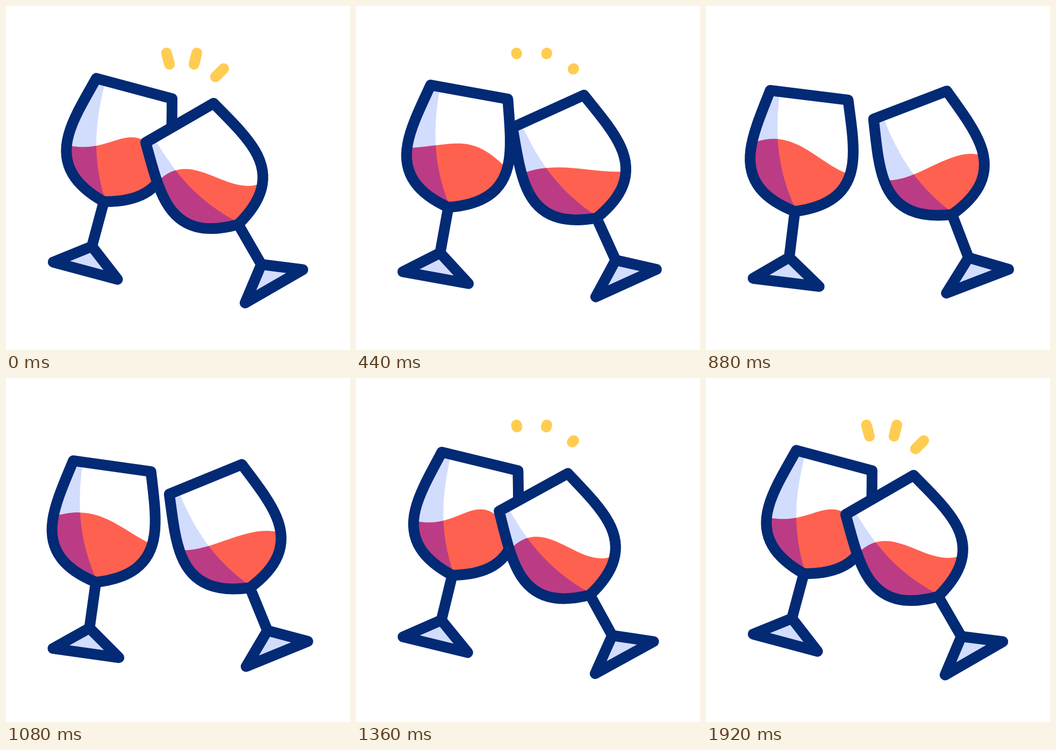
Animation of 640x640 px, one loop 2 s. Source, as an HTML page with a canvas:

```html
<!DOCTYPE html>
<html lang="en">
<head>
<meta charset="utf-8">
<title>Cheers</title>
<style>
html, body { margin: 0; height: 100%; overflow: hidden; background: #fff; }
canvas { display: block; width: 100vw; height: 100vh; }
</style>
</head>
<body>
<canvas id="stage" width="640" height="640"></canvas>
<script>
const ctx = document.getElementById('stage').getContext('2d');
const LOOP = 2000, STEP = 40, RAD = Math.PI / 180;
const NAVY = '#032a75', PALE = '#d2dcfd', RED = '#ff6150', PLUM = '#bb3c85', GOLD = '#ffcc52';

// Upright glass: origin at the middle of the rim, y runs down the stem
const bowl = new Path2D(`M-73 0 H73 C82 36 95.5 80 95.5 115 C96 174 58 203 0 218
  C-58 203 -96 174 -95.5 115 C-95.5 80 -82 36 -73 0 Z`);
const shade = new Path2D('M-55 0 C-55 90 -38 150 0 212 V230 H-110 V0 Z');
const stem = new Path2D('M0 218 V304');
const foot = new Path2D('M-62 351 L0 304 L62 351 Z');

// The wine surface is one Bezier curve: fixed control xs, heights that
// blend between the touching pose and the pose swung apart
const left = {
  mid: [238.5, 153.5], tilt: 15, pivot: [304, 493], swing: -8, turn: 825, end: 1645,
  xs: [118, 205, 235, 295], rest: [260, 277, 196, 292], apart: [228, 205, 283, 311]
};
const right = {
  mid: [323, 217.5], tilt: -30, pivot: [561, 559], swing: 9.1, turn: 812, end: 1618,
  xs: [283, 346, 409, 472], rest: [326, 263, 354, 331], apart: [361, 377, 275, 290]
};

// Centre x, y of each spark's outer end and the direction it points inwards
const sparks = [[298.5, 87.5, 75], [355, 87.5, 104], [405, 116.5, 135]];
const SPARK = 21.5;

function ease(t, from, to) {
  const u = Math.min(1, Math.max(0, (t - from) / (to - from)));
  return u < 0.5 ? 4 * u ** 3 : 1 - 4 * (1 - u) ** 3;
}

// Wine lags the glass, swings past rest on the clink, then settles
const slosh = t => ease(t, 40, 920) - 1.13 * ease(t, 860, 1520) + 0.13 * ease(t, 1520, 1920);

function winePath({ xs, rest, apart }, t) {
  const k = slosh(t);
  const [y0, y1, y2, y3] = rest.map((y, i) => y + (apart[i] - y) * k);
  const [x0, x1, x2, x3] = xs;
  return new Path2D(`M${x0 - 40} 480 V${y0} H${x0}
    C${x1} ${y1} ${x2} ${y2} ${x3} ${y3} H${x3 + 40} V480 Z`);
}

function fill(path, color) {
  ctx.fillStyle = color;
  ctx.fill(path);
}

function drawGlass(g, t) {
  const apart = ease(t, 0, g.turn) - ease(t, g.turn, g.end);
  const [px, py] = g.pivot, [mx, my] = g.mid;
  const wine = winePath(g, t);
  const upright = () => { ctx.translate(mx, my); ctx.rotate(g.tilt * RAD); };
  const tilted = () => { ctx.rotate(-g.tilt * RAD); ctx.translate(-mx, -my); };

  ctx.save();
  ctx.translate(px, py);
  ctx.rotate(g.swing * apart * RAD);
  ctx.translate(-px, -py);
  upright();
  fill(bowl, '#fff');
  fill(foot, PALE);

  ctx.save();
  ctx.clip(bowl);
  fill(shade, PALE);
  tilted();
  fill(wine, RED);
  upright();
  ctx.clip(shade);
  tilted();
  fill(wine, PLUM);
  ctx.restore();

  ctx.strokeStyle = NAVY;
  for (const part of [bowl, stem, foot]) ctx.stroke(part);
  ctx.restore();
}

function drawSparks(t) {
  const size = SPARK * (1 - ease(t, 160, 540) + ease(t, 1250, 1560));
  if (size < 0.01) return;
  ctx.strokeStyle = GOLD;
  for (const [x, y, angle] of sparks) {
    ctx.beginPath();
    ctx.moveTo(x, y);
    ctx.lineTo(x + size * Math.cos(angle * RAD), y + size * Math.sin(angle * RAD));
    ctx.stroke();
  }
}

function draw(now) {
  const t = Math.min(1920, Math.floor(now % LOOP / STEP) * STEP);
  ctx.fillStyle = '#fff';
  ctx.fillRect(0, 0, 640, 640);
  ctx.lineWidth = 20;
  ctx.lineCap = ctx.lineJoin = 'round';
  drawSparks(t);
  drawGlass(left, t);
  drawGlass(right, t);
}

const start = performance.now();
function tick() {
  draw(performance.now() - start);
  requestAnimationFrame(tick);
}
tick();
</script>
</body>
</html>
```
